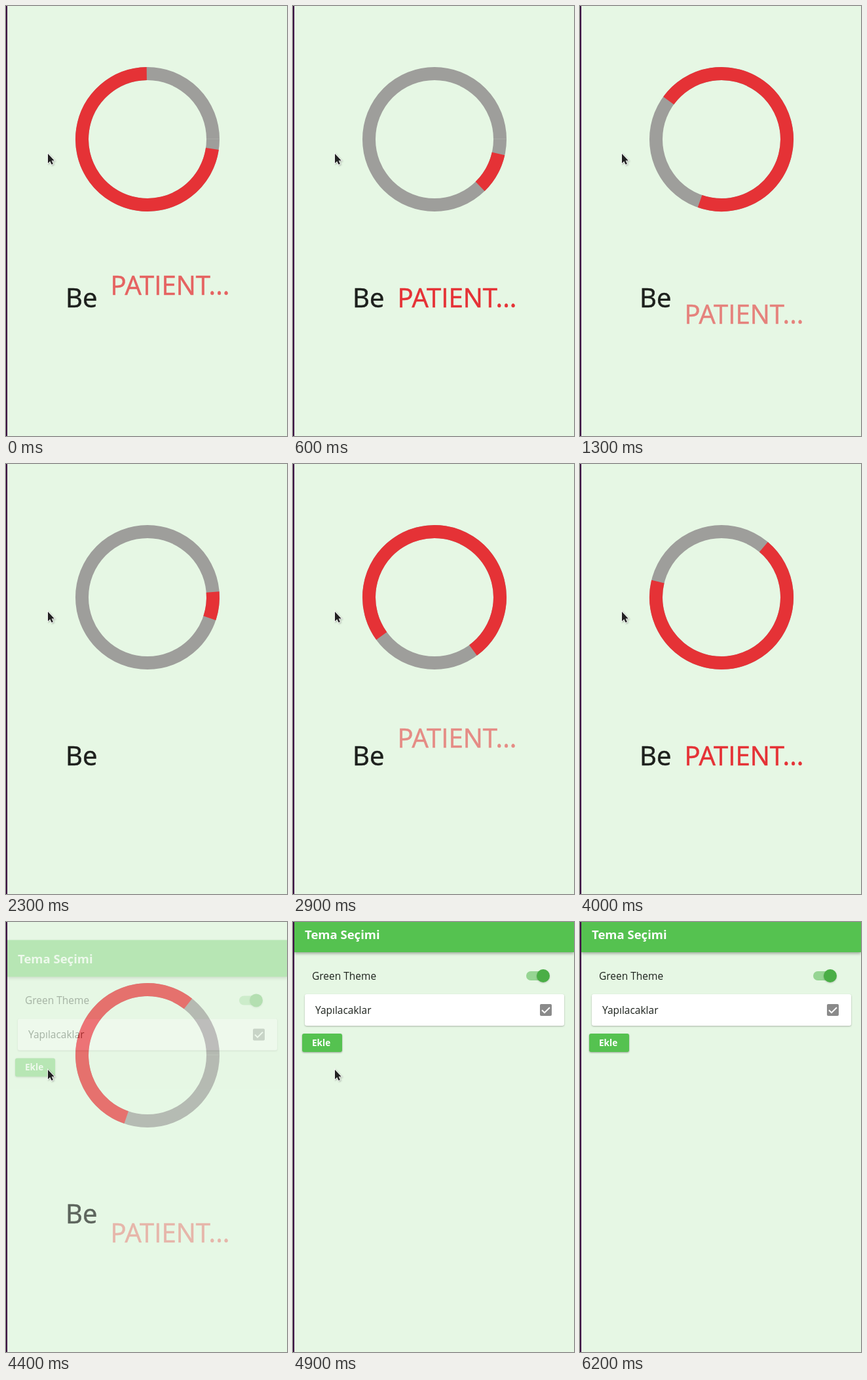
Write an HTML page that moves like this. It is 429 px wide and 655 px high and loops after 6800 ms.

```html
<!DOCTYPE html>
<html lang="tr">
<head>
<meta charset="utf-8">
<title>Tema Seçimi</title>
<style>
  html, body { margin: 0; width: 100%; height: 100%; overflow: hidden; background: #e6f7e4; }
  svg { display: block; width: 429px; height: 655px; font-family: "Open Sans", "Noto Sans", sans-serif; }
  .bar { fill: #55c250; filter: drop-shadow(0 2px 2px #0005); }
  .card { fill: #fff; filter: drop-shadow(0 1px 1px #0004); }
  .big { font-size: 40px; stroke-width: .6; }
  .label { font-size: 15.5px; fill: #1d231d; }
  .strong { font-weight: 700; fill: #fff; }
</style>
</head>
<body>
<svg viewBox="0 0 429 655">
  <rect width="429" height="655" fill="#e6f7e4"/>
  <g fill="none" stroke-width="20">
    <circle cx="216" cy="203" r="100" stroke="#9e9e9b"/>
    <path d="M306 202.5h20" stroke="#a8aaa5" stroke-width="1"/>
    <circle id="arc" cx="216" cy="203" r="100" stroke="#e53236" pathLength="360"/>
  </g>
  <text class="big" x="91" y="458.5" fill="#1d201d" stroke="#1d201d">Be</text>
  <text class="big" id="word" x="159.5" y="459" fill="#e53236" stroke="#e53236">PATIENT...</text>

  <g id="page">
    <rect x="2" y="-10" width="427" height="675" fill="#e6f7e4"/>
    <rect class="bar" x="2" y="-10" width="427" height="56"/>
    <text class="strong" x="18" y="25.5" font-size="18.5">Tema Seçimi</text>
    <text class="label" x="29" y="88">Green Theme</text>
    <rect x="356" y="75" width="33" height="14" rx="7" fill="#96d593"/>
    <circle cx="382" cy="82" r="10" fill="#4aae46" style="filter:drop-shadow(0 1px 1px #0003)"/>
    <rect class="card" x="18" y="110" width="396" height="48" rx="3"/>
    <text class="label" x="34" y="140">Yapılacaklar</text>
    <rect x="377" y="125" width="18" height="18" rx="2" fill="#8a8a8a"/>
    <path d="M380 134.2l4 4 8-8" fill="none" stroke="#fff" stroke-width="2"/>
    <rect class="bar" x="14" y="170" width="61" height="28" rx="3" style="filter:drop-shadow(0 1px 1px #0005)"/>
    <text class="strong" x="29" y="189" font-size="13.6">Ekle</text>
  </g>

  <rect width="2" height="655" fill="#3c0a42"/>
  <path id="cursor" d="M0 0V14.5L3.3 11.4 5.6 16.6 7.9 15.6 5.7 10.5H9.8Z"
    fill="#222" stroke="#fff" stroke-width="1.6" paint-order="stroke" style="filter:drop-shadow(1px 1px 1px #0004)"/>
</svg>
<script>
const LOOP = 6800, STEP = 100;
const $ = id => document.getElementById(id);
const [arc, word, page, cursor] = ["arc", "word", "page", "cursor"].map($);
const clamp = x => Math.min(1, Math.max(0, x));

function bezier(x1, y1, x2, y2) {
  const at = (a, b, s) => 3 * (1 - s) ** 2 * s * a + 3 * (1 - s) * s * s * b + s ** 3;
  return value => {
    const x = clamp(value);
    if (x === 0 || x === 1) return x;
    let lo = 0, hi = 1;
    for (let i = 0; i < 24; i++) {
      const mid = (lo + hi) / 2;
      if (at(x1, x2, mid) < x) lo = mid; else hi = mid;
    }
    return at(y1, y2, lo);
  };
}
const fastOutSlowIn = bezier(.4, 0, .2, 1);
const easeIn = bezier(.42, 0, 1, 1);
const easeOut = bezier(0, 0, .58, 1);

// Interpolates rows of [time, ...values], extending the last segment.
function track(rows, t) {
  let i = 1;
  while (i < rows.length - 1 && t > rows[i][0]) i++;
  const a = rows[i - 1], b = rows[i], k = (t - a[0]) / (b[0] - a[0]);
  return a.slice(1).map((v, j) => v + (b[j + 1] - v) * k);
}

// time, stroke cycles, full turns
const SPIN = [
  [0, .385, .177], [700, .87, .469], [900, 1.085, .6], [1000, 1.085, .6],
  [1300, 1.349, .763], [2300, 2.0835, 1.2164], [3400, 2.851, 1.7805], [4400, 3.63, 2.199]
];
// time, x, y
const POINTER = [
  [5700, 64, 225], [5800, 74, 207], [5900, 108, 150], [6000, 155, 70], [6100, 190, 14]
];

function drawSpinner(t) {
  const [cycles, turns] = track(SPIN, t);
  const p = cycles % 1;
  const head = 270 * fastOutSlowIn(2 * p), tail = 270 * fastOutSlowIn(2 * p - 1);
  const sweep = Math.max(head - tail, .1);
  const start = tail + turns * 360 + p * 90 - 90;
  arc.setAttribute("stroke-dasharray", `${sweep} ${360 - sweep}`);
  arc.setAttribute("transform", `rotate(${start} 216 203)`);
}

function drawWord(t) {
  const u = (t + 450) % 3050;
  const enter = clamp(u / 800), leave = clamp((u - 1400) / 600);
  word.setAttribute("transform", `translate(0 ${43 * (enter - 1 + leave)})`);
  word.setAttribute("opacity", easeOut(enter) * (1 - easeIn(leave)));
}

function drawPage(t) {
  const k = clamp((t - 4249) / 300);
  page.setAttribute("transform", `translate(0 ${170 * (1 - fastOutSlowIn(k))})`);
  page.setAttribute("opacity", easeIn(k));
}

function drawCursor(t) {
  const [x, y] = track(POINTER, Math.max(5700, t));
  cursor.setAttribute("transform", `translate(${x} ${y})`);
  cursor.setAttribute("visibility", t < 6200 ? "visible" : "hidden");
}

const origin = performance.now();
function draw(now) {
  const t = Math.floor(Math.max(0, now - origin) % LOOP / STEP) * STEP;
  for (const part of [drawSpinner, drawWord, drawPage, drawCursor]) part(t);
  requestAnimationFrame(draw);
}
draw(origin);
</script>
</body>
</html>
```
